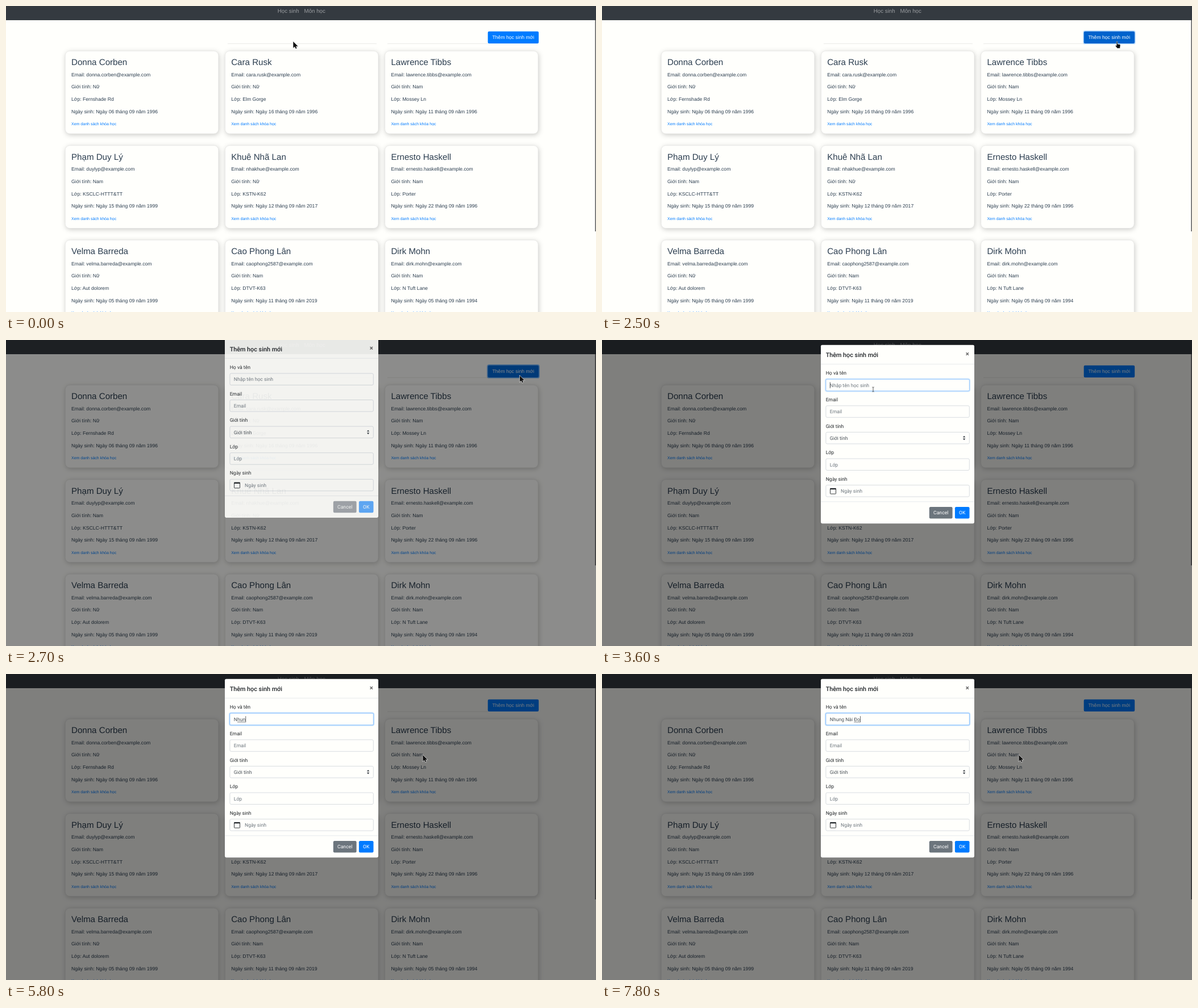
An HTML page for the animation above (8 s loop, 1038 by 539 pixels).

```html
<!DOCTYPE html>
<html lang="vi">
<head>
<meta charset="utf-8">
<title>Học sinh</title>
<style>
  html, body { margin: 0; width: 100%; height: 100%; overflow: hidden; background: #fffffc; }
  svg { display: block; width: 100%; height: 100%; }
  text { white-space: pre; text-rendering: geometricPrecision; }
  .page { font: 8.64px "Liberation Sans", Arial, sans-serif; fill: #2c3e50; }
  .page .name { font-size: 15.12px; }
  .page .link { font-size: 7.02px; fill: #007bff; }
  .page .nav { font-size: 9.72px; fill: #fff; fill-opacity: .5; }
  .card { fill: #fffffc; stroke: #e0e0dd; stroke-width: .6; filter: drop-shadow(1.8px 2.2px 4.2px rgba(0,0,0,.2)); }
  .modal { font: 8.64px Roboto, sans-serif; fill: #212529; }
  .modal .title { font-size: 10.8px; font-weight: 500; }
  .modal .hint { fill: #6c757d; }
  .modal .value { fill: #495057; }
  .field { fill: #fffffc; stroke: #ced4da; stroke-width: .8; }
  .rule { stroke: #dee2e6; stroke-width: .7; }
  .page .white, .modal .white { fill: #fff; text-anchor: middle; }
</style>
</head>
<body>
<svg id="stage" viewBox="0 0 1038 539" preserveAspectRatio="none"></svg>
<script>
const LOOP = 8000, STEP = 100;
const stage = document.getElementById('stage');

const text = (x, y, s, cls = '', extra = '') =>
  `<text x="${x}" y="${y}" class="${cls}" ${extra}>${s.replace(/&/g, '&amp;')}</text>`;
const rect = (x, y, w, h, r, attrs) =>
  `<rect x="${x}" y="${y}" width="${w}" height="${h}" rx="${r}" ${attrs}/>`;

// name, mailbox, gender, class, day and year of birth
const students = [
  ['Donna Corben', 'donna.corben', 'Nữ', 'Fernshade Rd', '06', 1996],
  ['Cara Rusk', 'cara.rusk', 'Nữ', 'Elm Gorge', '16', 1996],
  ['Lawrence Tibbs', 'lawrence.tibbs', 'Nam', 'Mossey Ln', '11', 1996],
  ['Phạm Duy Lý', 'duylyp', 'Nam', 'KSCLC-HTTT&TT', '15', 1999],
  ['Khuê Nhã Lan', 'nhakhue', 'Nữ', 'KSTN-K62', '12', 2017],
  ['Ernesto Haskell', 'ernesto.haskell', 'Nam', 'Porter', '22', 1996],
  ['Velma Barreda', 'velma.barreda', 'Nữ', 'Aut dolorem', '05', 1999],
  ['Cao Phong Lân', 'caophong2587', 'Nam', 'DTVT-K63', '11', 2019],
  ['Dirk Mohn', 'dirk.mohn', 'Nam', 'N Tuft Lane', '05', 1994]
];

function card([name, mail, gender, group, day, year], i) {
  const x = 104.2 + 281.2 * (i % 3), y = 79.2 + 166.5 * Math.floor(i / 3), tx = x + 10.8;
  const lines = [`Email: ${mail}@example.com`, `Giới tính: ${gender}`, `Lớp: ${group}`,
    `Ngày sinh: Ngày ${day} tháng 09 năm ${year}`];
  return rect(x, y, 269.6, 145.8, 8, 'class="card"') +
    text(tx, y + 25, name, 'name') +
    lines.map((s, k) => text(tx, y + 44.5 + 21.65 * k, s)).join('') +
    text(tx, y + 131.2, 'Xem danh sách khóa học', 'link');
}

function field(label, i) {
  const y = 69.2 + 46.6 * i;
  const hint = i ? label : 'Nhập tên học sinh';
  return text(393.7, y - 7.8, label) +
    rect(393.9, y, 252.4, 20.5, 2.2, `class="field" ${i ? '' : 'id="nameBox"'}`) +
    text(i === 4 ? 420 : 400.8, y + 13.6, hint, i === 2 ? 'value' : 'hint', i ? '' : 'id="nameHint"');
}

const labels = ['Họ và tên', 'Email', 'Giới tính', 'Lớp', 'Ngày sinh'];

stage.innerHTML = `
<g class="page">
  <rect width="1038" height="539" fill="#fffffc"/>
  <rect width="1038" height="25" fill="#343a40"/>
  ${text(477.8, 12.2, 'Học sinh', 'nav')}${text(524.6, 12.2, 'Môn học', 'nav')}
  <path d="M390 66.3H652M671 66.3H848" stroke="#000" stroke-opacity=".07" stroke-width="1.2"/>
  ${students.map(card).join('')}
  ${rect(847, 44, 91, 22.7, 3, 'id="ring" fill="none" stroke="#007bff" stroke-opacity=".5" stroke-width="1.8"')}
  ${rect(847.7, 44.7, 89.5, 21.2, 2.2, 'id="add"')}
  ${text(892.4, 58.3, 'Thêm học sinh mới', 'white')}
  <rect x="1036.3" y="25" width="1.7" height="372" fill="#6e6e6e"/>
</g>
<rect id="shade" width="1038" height="539"/>
<g id="modal" class="modal">
  ${rect(385, 8.8, 270, 314.4, 2.4, 'fill="#fffffc"')}
  ${text(393.7, 30, 'Thêm học sinh mới', 'title')}
  <path d="M640.6 22.2l4.4 4.6m0-4.6l-4.4 4.6" stroke="#666" stroke-width="1.4"/>
  <path d="M385 42.5H655M385 284.8H655" class="rule"/>
  ${rect(393, 68.3, 254.2, 22.3, 3, 'id="glow" fill="none" stroke="#007bff" stroke-opacity=".28" stroke-width="1.8"')}
  ${labels.map(field).join('')}
  <path d="M634.9 171.6l2.2-2.9 2.2 2.9zM634.9 173.6l2.2 2.9 2.2-2.9z" fill="#343a40"/>
  <path d="M401.5 262.2h10v8.1q0 .8-.8.8h-8.4q-.8 0-.8-.8z" fill="none" stroke="#212529" stroke-width=".9"/>
  <path d="M401.1 261.9q0-1 1-1h8.8q1 0 1 1v1.3h-10.8z"/>
  <text id="typed" x="400.8" y="82.8" class="value"></text>
  <path id="under" stroke="#495057" stroke-width=".7"/>
  <path id="caret" stroke="#212529" stroke-width=".7"/>
  <g id="actions">
    ${rect(575.8, 294, 40.8, 20.5, 2.2, 'fill="#6c757d"')}${text(596.2, 307.4, 'Cancel', 'white')}
    ${rect(620.9, 294, 25.6, 20.5, 2.2, 'fill="#007bff"')}${text(633.7, 307.4, 'OK', 'white')}
  </g>
</g>
<g id="pointer">
  <path id="arrow" d="M0 0V12.4L2.8 10L4.7 13.6L7 12.6L5.4 9.2H9.2Z" fill="#111" stroke="#fff" stroke-width=".6"/>
  <path id="hand" d="M2.2 1Q3.2-.3 4 1V5L8 5.6Q9.2 6 9 7.4L8.3 12.6H3.4L.4 8.6Q0 7.2 1.2 7.2L2.2 8Z" fill="#111" stroke="#fff" stroke-width=".5"/>
  <path id="beam" d="M-1.7-4H-.5L0-3.4L.5-4H1.7M0-3.4V3.4M-1.7 4H-.5L0 3.4L.5 4H1.7" fill="none" stroke="#333" stroke-width=".8"/>
</g>`;

const $ = Object.fromEntries([...stage.querySelectorAll('[id]')].map(e => [e.id, e]));
const set = (e, attrs) => { for (const k in attrs) e.setAttribute(k, attrs[k]); };
const show = (e, on) => set(e, { display: on ? 'inline' : 'none' });

// time, x, y
const path = [
  [0, 505, 62], [600, 496, 7], [800, 496, 7], [900, 533, 26], [1000, 533, 26],
  [1600, 816, 97], [1700, 816, 97], [1800, 817, 97], [1900, 817, 97], [2000, 872, 95],
  [2100, 938, 101], [2200, 938, 101], [2300, 923, 82], [2400, 910, 68], [2500, 903, 62],
  [2600, 903.5, 62], [2900, 903.5, 62], [3000, 649, 110], [3100, 649, 110], [3200, 580, 106],
  [3300, 515, 98], [3400, 476, 96], [3500, 476, 96], [3600, 477, 87], [3800, 477, 87],
  [3900, 733, 142]
];
// time, shade, modal opacity, modal offset
const opening = [[2500, 0, 0, -27], [2600, .11, .21, -22], [2700, .45, .9, -10.3],
  [2800, .5, 1, -1.5], [2900, .5, 1, -1.5], [3000, .5, 1, 0]];
// time, text, start of the underlined part
const typing = [
  [5400, 'N'], [5500, 'Nh', 1], [5600, 'Nhu', 1], [5800, 'Nhun', 1], [6000, 'Nhung', 1],
  [6100, 'Nhung '], [6500, 'Nhung N'], [6700, 'Nhung Na', 7], [6900, 'Nhung Nài', 7],
  [7000, 'Nhung Nài '], [7500, 'Nhung Nài D', 10], [7600, 'Nhung Nài Đ', 10], [7800, 'Nhung Nài Đo', 10]
];

function sample(keys, t) {
  const next = keys.findIndex(k => k[0] > t);
  if (next < 0) return keys[keys.length - 1].slice(1);
  if (!next) return keys[0].slice(1);
  const a = keys[next - 1], b = keys[next], u = (t - a[0]) / (b[0] - a[0]);
  return a.slice(1).map((v, i) => v + (b[i + 1] - v) * u);
}

function drawInput(t) {
  const focused = t >= 3600;
  const [, value = '', from] = typing.filter(k => k[0] <= t).pop() || [];
  $.typed.textContent = value;
  show($.nameHint, !value);
  set($.nameBox, { style: focused ? 'stroke:#80bdff' : '' });
  show($.glow, focused);
  set($.glow, { opacity: t < 3700 ? .7 : 1 });

  const end = 401 + (value ? $.typed.getComputedTextLength() : 0);
  set($.caret, { d: `M${end + .3} 74.2V85` });
  show($.caret, focused && !(t >= 4100 && t < 4800));
  set($.under, { d: from ? `M${400.8 + $.typed.getSubStringLength(0, from)} 84.7H${end}` : '' });
}

function render(t) {
  const [shade, alpha, dy] = sample(opening, t);
  set($.shade, { opacity: shade });
  set($.modal, { opacity: alpha, transform: `translate(0 ${dy})` });
  set($.actions, { opacity: t < 2800 ? .65 : 1 });

  const pressed = t >= 2500 && t < 2600, hover = t >= 2500 && t < 3000;
  set($.add, { fill: pressed ? '#0062cc' : hover ? '#0069d9' : '#007bff' });
  show($.ring, hover);
  set($.ring, { opacity: pressed ? .5 : 1 });

  drawInput(t);

  const [x, y] = sample(path, t);
  const shape = pressed || (t >= 600 && t < 900) ? 'hand' : t >= 3400 && t < 3900 ? 'beam' : 'arrow';
  set($.pointer, { transform: `translate(${x} ${y})` });
  for (const id of ['arrow', 'hand', 'beam']) show($[id], id === shape);
}

const start = performance.now();
function tick() {
  const t = (performance.now() - start) % LOOP;
  render(Math.floor(t / STEP) * STEP);
  requestAnimationFrame(tick);
}
tick();
</script>
</body>
</html>
```
